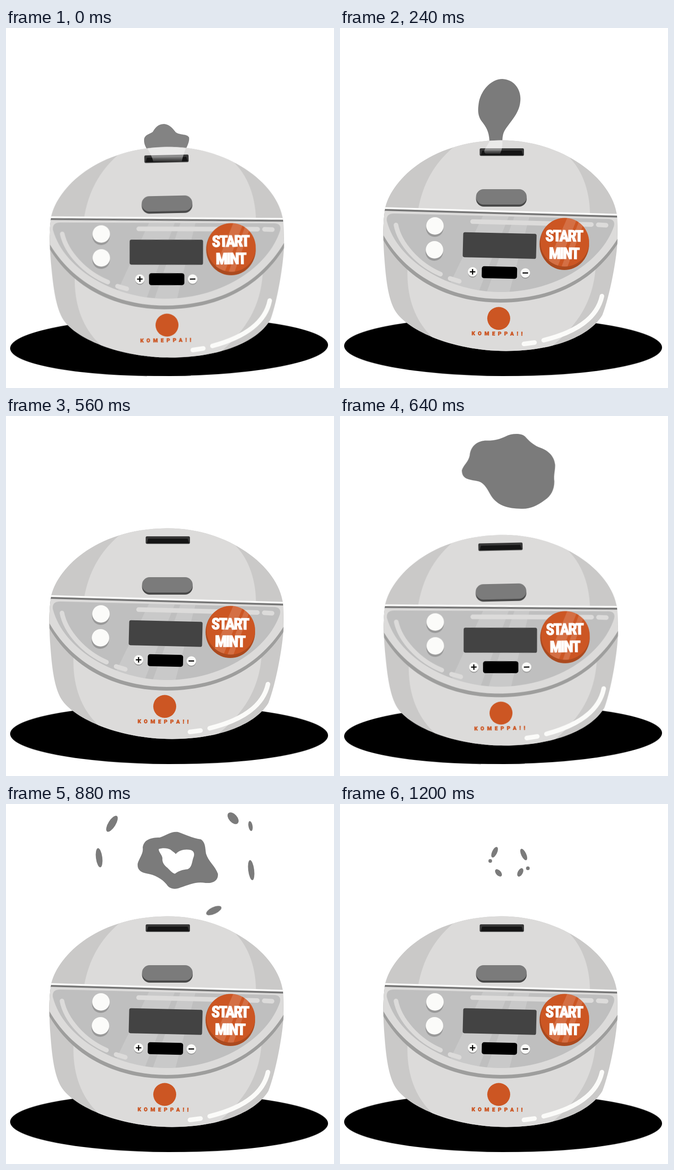
An HTML page that plays this animation: 715 by 784 pixels, repeating every 1.28 s.

```html
<!DOCTYPE html>
<html lang="en">
<head>
<meta charset="utf-8">
<title>Rice cooker</title>
<style>
html, body { margin: 0; width: 100%; height: 100%; overflow: hidden; background: #fff; }
svg { display: block; width: 100vw; height: 100vh; }

.cooker { transform-origin: 350px 450px; animation: rock 320ms step-end infinite; }
@keyframes rock {
  0%, 50% { transform: translate(1px, 14.5px) rotate(-1.25deg); }
  25% { transform: translate(-9px, 6px) rotate(-4.55deg); }
  75%, 100% { transform: none; }
}
.shadow { transform-origin: 355.5px 694px; animation: tilt 320ms step-end infinite; }
@keyframes tilt {
  0%, 50% { transform: rotate(-.6deg); }
  25% { transform: translateY(.5px) rotate(-3.15deg); }
  75%, 100% { transform: rotate(.3deg); }
}

/* each puff is visible for one 80 ms step, --i steps into the loop */
.puff { visibility: hidden; animation: puff 1280ms step-end infinite; animation-delay: calc(var(--i) * 80ms - 1280ms); }
@keyframes puff {
  0% { visibility: visible; }
  6.25%, 100% { visibility: hidden; }
}

.smoke { fill: #7b7b7b; }
.steam { fill: url(#fade); }
.hole { fill: #fff; }
.light { fill: #dcdbda; }
.side { fill: #cac9c8; }
.white { fill: #fbfbf9; }
.shade { fill: #999; }
.gleam { fill: #fff; opacity: .15; }
.line { fill: none; stroke-width: 10; stroke-linecap: round; }
.label { font: 900 34px Impact, "Roboto Condensed", Roboto, "Open Sans", sans-serif; font-stretch: 75%; letter-spacing: -2.2px; text-anchor: middle; fill: #fff; stroke: #fff; stroke-width: 1.6; }
.brand { font: 900 11.5px Roboto, Inter, sans-serif; letter-spacing: 6.4px; fill: #cc5623; stroke: #cc5623; stroke-width: .6; }
</style>
</head>
<body>
<svg viewBox="0 0 715 784" preserveAspectRatio="none">
<defs>
  <linearGradient id="fade" x1="0" y1="0" x2="0" y2="1">
    <stop offset="0" stop-color="#fff" stop-opacity=".4"/>
    <stop offset=".7" stop-color="#fff" stop-opacity=".44"/>
    <stop offset="1" stop-color="#fff" stop-opacity=".1"/>
  </linearGradient>
  <clipPath id="body">
    <path d="M98 395C108 338 190 246 350 244.5C480 243 594 325 604 409L605 460C604 500 588 585 572 625C545 670 470 703 362 703.5C240 703 140 655 118 612C107 590 101 560 97 505C94 470 93 425 98 395Z"/>
  </clipPath>
  <clipPath id="panel">
    <path d="M118 404L585 416Q601 417 597 432C570 510 470 575 350 575C240 575 125 510 102 420Q100 404 118 404Z"/>
  </clipPath>
  <clipPath id="face"><circle cx="490" cy="466.5" r="53"/></clipPath>

  <path id="cloud" d="M254 118C258 105 270 98 273 82C275 60 290 48 310 46C330 47 345 43 360 36C375 28 398 28 407 36C416 46 425 55 440 62C465 70 478 85 480 105C480 120 476 130 478 145C478 165 470 180 455 190C435 205 418 212 398 211C365 211 340 203 325 180C316 165 310 150 295 145C275 140 254 142 254 118Z"/>
  <path id="ring" d="M287 130C290 118 300 108 298 95C300 78 315 73 335 73C350 68 360 59 375 61C390 66 405 74 425 77C435 84 434 95 436 108C441 125 456 135 462 152C463 168 450 173 435 172C415 168 398 176 380 182C368 187 356 185 350 175C340 163 325 154 305 151C290 148 286 140 287 130Z"/>
  <path id="heart" d="M333 98C342 95 352 96 358 99C363 103 368 106 370 109C378 100 390 98 402 100C410 102 412 109 408 118C405 128 405 138 396 142C384 143 376 146 368 152C362 150 358 145 352 139C344 133 340 126 341 118C340 110 332 104 333 98Z"/>
  <g id="drops">
    <ellipse rx="8" ry="20" transform="translate(231 43) rotate(32)"/>
    <ellipse rx="7" ry="21" transform="translate(203 117) rotate(-7)"/>
    <ellipse rx="9" ry="15" transform="translate(495 31) rotate(-42)"/>
    <ellipse rx="4.5" ry="11" transform="translate(533 48) rotate(-10)"/>
    <ellipse rx="6.5" ry="22" transform="translate(534.5 144) rotate(-7)"/>
    <ellipse rx="18" ry="7.5" transform="translate(453 232) rotate(-25)"/>
  </g>
  <g id="crumbs">
    <ellipse rx="5.5" ry="12.5" transform="translate(337 105) rotate(25)"/>
    <ellipse rx="5.5" ry="13.5" transform="translate(400.5 110) rotate(-25)"/>
    <circle cx="327.5" cy="124" r="4"/>
    <circle cx="409.5" cy="140" r="4"/>
    <ellipse rx="5.5" ry="10" transform="translate(393 149) rotate(28)"/>
    <ellipse rx="5.5" ry="9.5" transform="translate(345.5 150) rotate(-42)"/>
  </g>
</defs>

<ellipse class="shadow" cx="355.5" cy="694" rx="346.5" ry="64"/>

<!-- smoke behind the lid -->
<g class="smoke">
  <path class="puff" style="--i:0" fill="#838383" d="M321 290C316 270 300 262 301 243C302 232 314 231 320 226C328 212 336 209 345 209C356 210 363 218 370 227C380 234 394 230 399 238C401 252 390 262 383 290Z"/>
  <path class="puff" style="--i:1" d="M318 280C315 258 299 242 301 222C303 208 313 206 319 198C326 183 335 178 346 178C358 179 366 190 372 199C382 206 393 206 397 217C400 236 382 250 372 280Z"/>
  <path class="puff" style="--i:2" d="M324 280C324 250 300 238 299 205C300 170 318 144 349 144C378 144 398 168 397 198C394 228 368 250 364 280Z"/>
  <path class="puff" style="--i:3" d="M326 252C326 225 318 215 308 202C300 190 300 178 303 160C309 134 330 111 354 111C380 112 396 135 393 160C391 184 375 200 361 220C354 230 354 240 354 252Z"/>
  <path class="puff" style="--i:4" d="M332 266C334 234 326 218 315 200C301 184 300 168 303 146C302 116 326 88 360 88C392 88 412 112 410 140C410 168 392 186 372 204C352 222 352 242 349 266Z"/>
  <path class="puff" style="--i:5" d="M335 254C338 225 330 205 326 180C318 160 300 150 303 137C309 122 303 115 303 104C305 90 320 91 335 84C345 76 352 65 366 65C382 65 387 76 397 81C412 84 425 90 428 102C428 112 424 118 426 130C430 150 420 165 405 180C390 192 380 205 362 212C350 220 348 235 343 254Z"/>
  <path class="puff" style="--i:6" d="M345 240C348 222 338 204 324 184C310 168 286 158 288 138C294 122 286 112 287 96C292 76 314 76 332 64C346 52 356 42 374 42C394 42 402 56 416 62C438 66 452 80 453 98C452 112 448 122 450 136C452 160 438 176 418 188C398 198 378 206 362 216C352 224 350 232 345 240Z"/>
  <g class="puff" style="--i:8"><use href="#cloud" transform="translate(37 12) scale(.9)"/></g>
  <g class="puff" style="--i:9">
    <use href="#cloud"/>
    <path class="hole" d="M361 103C366 99 371 101 374 107C382 110 392 108 394 114C390 120 383 121 380 128C374 131 370 126 364 124C359 122 364 116 361 110Z"/>
    <ellipse rx="9" ry="18" transform="translate(261 57) rotate(38)"/>
    <ellipse rx="9" ry="16" transform="translate(491.5 163) rotate(15)"/>
    <ellipse rx="10" ry="7" transform="translate(440 209.5) rotate(-35)"/>
  </g>
  <g class="puff" style="--i:10">
    <use href="#ring" transform="translate(-56 -18) scale(1.15)"/>
    <use href="#heart" class="hole" transform="translate(148 49) scale(.6)"/>
    <use href="#drops" transform="translate(37 12) scale(.9)"/>
  </g>
  <g class="puff" style="--i:11">
    <use href="#ring"/>
    <use href="#heart" class="hole"/>
    <use href="#drops"/>
  </g>
  <g class="puff" style="--i:12">
    <use href="#ring" transform="translate(37 12) scale(.9)"/>
    <use href="#heart" class="hole" transform="translate(-56 -18) scale(1.15)"/>
  </g>
  <g class="puff" style="--i:13">
    <use href="#ring" transform="translate(74 24) scale(.8)"/>
    <use href="#heart" class="hole" transform="translate(-119 -39) scale(1.32)"/>
  </g>
  <g class="puff" style="--i:14"><use href="#crumbs" transform="translate(-240 -82) scale(1.65)"/></g>
  <g class="puff" style="--i:15"><use href="#crumbs"/></g>
</g>

<g class="cooker">
  <g clip-path="url(#body)">
    <path class="side" d="M80 230H620V720H80Z"/>
    <path class="light" d="M170 398C180 340 205 295 248 259L262 235H450L487 270C525 300 545 350 545 408Z"/>
    <path class="light" d="M147 500V530C146 590 165 635 194 666L240 720H440L461 694C520 645 558 590 558 500Z"/>

    <!-- front panel -->
    <path fill="#9e9e9d" d="M90 395L610 410V462L605 470C545 562 450 598 350 598C250 598 150 557 95 463L90 454Z"/>
    <path class="light" d="M90 395L610 410V451L605 459C545 554 450 590 350 590C250 590 150 547 95 452L90 443Z"/>
    <g clip-path="url(#panel)">
      <path fill="#bfbfbf" d="M90 390H620V590H90Z"/>
      <path class="gleam" d="M316 400H372L300 580H228Z"/>
      <path class="gleam" d="M384 400H416L368 580H318Z"/>
    </g>
    <path class="line" stroke="#dcdbda" d="M122 429C130 470 170 515 219 536M240 545.5L260 551.5M289 421.5L548 428M563 428.5L580 429.5"/>

    <path d="M90 392L610 407" stroke="#fbfbfa" stroke-width="4"/>
    <path d="M90 395.8L610 410.8" stroke="#777" stroke-width="4"/>
  </g>

  <!-- lid -->
  <rect x="304.5" y="262" width="96.5" height="16.5" rx="3" fill="#383838"/>
  <path fill="#151515" d="M310 267H396L399 277H307Z"/>
  <rect x="296.5" y="355" width="110.5" height="34" rx="17" fill="#484848"/>
  <rect x="296.5" y="351" width="110.5" height="33.5" rx="16.7" fill="#7b7b7b"/>

  <!-- controls -->
  <circle class="shade" cx="206.5" cy="436" r="19"/>
  <circle class="white" cx="207" cy="431" r="19"/>
  <circle class="shade" cx="205.5" cy="488" r="19"/>
  <circle class="white" cx="206" cy="483" r="19"/>
  <rect x="268" y="446.5" width="160" height="54.5" rx="4" fill="#434343" transform="rotate(1.4 348 474)"/>
  <rect x="309" y="519.5" width="77" height="26" rx="5" transform="rotate(1.2 347.5 532.5)"/>
  <circle class="shade" cx="289" cy="533.5" r="10"/>
  <circle class="white" cx="289" cy="531" r="10.3"/>
  <circle class="shade" cx="404" cy="536" r="10"/>
  <circle class="white" cx="404" cy="533.5" r="10.3"/>
  <path d="M283 531H295M289 525V537M398 533.5H410" stroke="#000" stroke-width="2.5"/>

  <ellipse cx="489" cy="470.5" rx="54" ry="56.5" fill="#ab4a1f"/>
  <circle cx="490" cy="466.5" r="53" fill="#cc5623"/>
  <g clip-path="url(#face)">
    <path class="gleam" d="M499 405H521L470 530H445Z"/>
    <path class="gleam" d="M527 405H539L492 530H479Z"/>
  </g>
  <g transform="rotate(.5 489 470)">
    <text class="label" x="488" y="464.5">START</text>
    <text class="label" x="488" y="502.5">MINT</text>
  </g>

  <!-- badge -->
  <circle cx="346" cy="632.5" r="25" fill="#cc5623"/>
  <text class="brand" x="287" y="669" transform="rotate(.5 287 669)">KOMEPPA!!</text>

  <path class="line" stroke="#fbfbf9" d="M571 584C562 625 525 660 444 680M401 688L424 685"/>
</g>

<!-- steam in front of the lid -->
<g class="steam">
  <path class="puff" style="--i:0" d="M308 262Q350 256 392 262C388 272 385 282 383 291H321C319 282 314 272 308 262Z"/>
  <path class="puff" style="--i:1" d="M314 251Q348 249 382 251C376 262 368 272 362 284H306C312 274 315 262 314 251Z"/>
  <path class="puff" style="--i:2" d="M320 260Q344 258 368 260C365 272 368 282 368 291H318C322 280 322 270 320 260Z"/>
  <path class="puff" style="--i:3" d="M326 246Q340 244 354 245C354 256 354 264 349 274H318C308 268 322 258 326 246Z"/>
  <path class="puff" style="--i:4" d="M332 260L349 259C348 270 346 280 340 290H324C330 280 332 270 332 260Z"/>
  <path class="puff" style="--i:5" d="M334 251L343 250C339 265 334 275 327 280Q323 281 323 278C329 270 333 262 334 251Z"/>
</g>
</svg>
</body>
</html>
```
